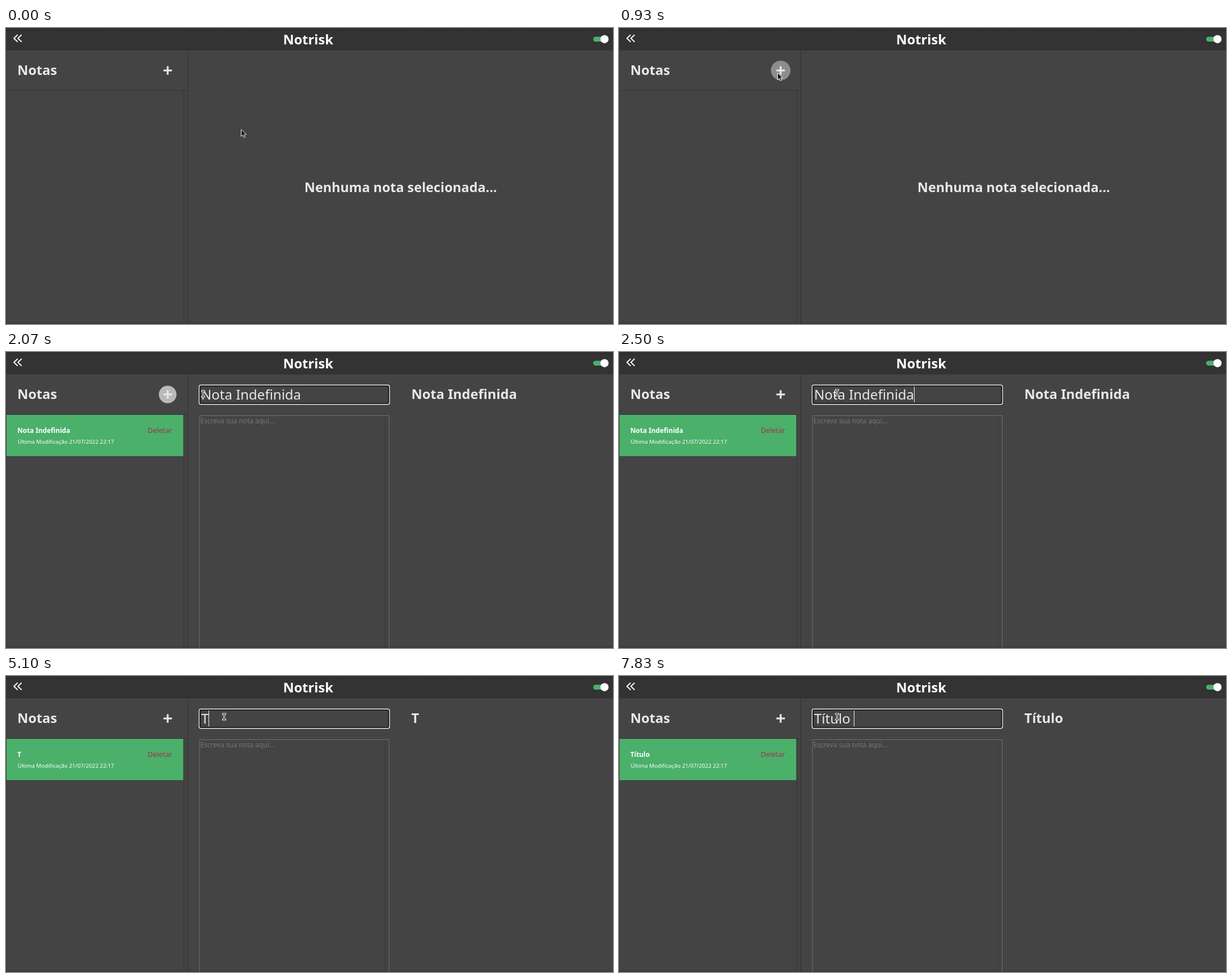
An HTML page with a canvas for the animation above (8000 ms loop, 1070 by 523 pixels).

```html
<!DOCTYPE html>
<html lang="pt-BR">
<head>
<meta charset="utf-8">
<title>Notrisk</title>
<style>
  html, body { margin: 0; width: 100%; height: 100%; overflow: hidden; background: #444; }
  canvas { display: block; }
</style>
</head>
<body>
<canvas id="stage" width="1070" height="523"></canvas>
<script>
const W = 1070, H = 523, LOOP = 8000;
const ctx = document.getElementById('stage').getContext('2d');
const FONT = '"Noto Sans", "Open Sans", sans-serif';
const HEADING = '700 23.6px ' + FONT;
const INPUT = '400 24px ' + FONT;
const LIGHT = '#e8e8e8', LINE = '#343434', GREEN = '#4bb06a';

const CREATED = 1230, CLICKED = 2770, SELECTED = 3570;
// Title text from each moment on
const TYPING = [
  [CREATED, 'Nota Indefinida'], [5100, 'T'], [6430, 'Tí'], [6830, 'Tít'],
  [6970, 'Títu'], [7270, 'Títul'], [7530, 'Título'], [7830, 'Título ']
];

const clamp = v => Math.max(0, Math.min(1, v));
const span = (t, a, b) => clamp((t - a) / (b - a));
const smooth = p => p * p * (3 - 2 * p);
const easeOut = p => 1 - (1 - p) ** 2;
const mix = (a, b, p) => a + (b - a) * p;

function rect(x, y, w, h, color) {
  ctx.fillStyle = color;
  ctx.fillRect(x, y, w, h);
}

function text(str, x, y, font, color, align = 'left') {
  ctx.font = font;
  ctx.fillStyle = color;
  ctx.textAlign = align;
  ctx.fillText(str, x, y);
}

function disc(x, y, r, color) {
  ctx.fillStyle = color;
  ctx.beginPath();
  ctx.arc(x, y, r, 0, Math.PI * 2);
  ctx.fill();
}

function box(x, y, w, h, r, color, width) {
  ctx.strokeStyle = color;
  ctx.lineWidth = width;
  ctx.beginPath();
  ctx.roundRect(x, y, w, h, r);
  ctx.stroke();
}

function poly(points, close) {
  ctx.beginPath();
  points.forEach(([x, y]) => ctx.lineTo(x, y));
  if (close) ctx.closePath();
}

function shade(y, h, from, to) {
  const g = ctx.createLinearGradient(0, y, 0, y + h);
  g.addColorStop(0, `rgba(0,0,0,${from})`);
  g.addColorStop(1, `rgba(0,0,0,${to})`);
  rect(0, y, W, h, g);
}

function drawHeader() {
  rect(0, 0, W, 39, '#333');
  shade(0, 6, 0.12, 0);
  rect(0, 39, W, 1, '#3b3b3b');
  ctx.strokeStyle = '#f4f4f4';
  ctx.lineWidth = 2;
  ctx.lineCap = 'round';
  ctx.lineJoin = 'round';
  for (const x of [14, 21]) {
    poly([[x + 6, 12.5], [x, 18.2], [x + 6, 24]]);
    ctx.stroke();
  }
  text('Notrisk', 532.7, 29, HEADING, '#fff', 'center');
  ctx.fillStyle = GREEN;
  ctx.beginPath();
  ctx.roundRect(1035, 15.5, 22, 8.5, 4.2);
  ctx.fill();
  disc(1055, 19.7, 7.2, '#fff');
}

function drawAddButton(t) {
  const shown = smooth(span(t, 740, 1010)) * 0.6 + smooth(span(t, 1010, 1250)) * 0.4;
  const left = smooth(span(t, 1920, 2400));
  const alpha = shown * (1 - left) * 0.82;
  const pressed = smooth(span(t, 1000, 1200)) * (1 - left);
  if (alpha > 0) disc(285, 75, mix(17.3, 15, pressed), `rgba(255,255,255,${alpha})`);
  rect(277.5, 73.4, 15, 3.2, LIGHT);
  rect(283.4, 67.5, 3.2, 15, LIGHT);
}

function drawSidebar(t) {
  rect(0, 39, 1, H - 39, LINE);
  rect(320, 39, 1, H - 39, LINE);
  rect(0, 110, 321, 1, LINE);
  rect(313, 111, 1, H - 111, LINE);
  text('Notas', 20, 83, HEADING, LIGHT);
  drawAddButton(t);
}

function drawCard(title) {
  rect(1, 111, 311.5, 73, GREEN);
  text(title, 20, 143, `700 11.8px ${FONT}`, '#fff');
  text('Deletar', 293, 142.5, `400 12.5px ${FONT}`, '#a03352', 'right');
  text('Última Modificação 21/07/2022 22:17', 20.5, 162, `400 9.75px ${FONT}`, '#fff');
}

function drawInput(t, title) {
  box(340.5, 58.5, 335.5, 34, 3, '#fff', 1.4);
  box(342, 60, 332.5, 31, 1.5, '#101010', 1.6);
  const x = 344;
  ctx.font = INPUT;
  ctx.textAlign = 'left';
  const selecting = t >= SELECTED && t < 5100;
  if (selecting) rect(x, 61, ctx.measureText(title).width, 29, '#3f48dc');
  text(title, x, 84, INPUT, selecting ? '#fff' : LIGHT);
  if (selecting) return;

  const placed = t >= CLICKED && t < SELECTED;
  const since = placed ? CLICKED : TYPING.filter(k => k[0] <= t).pop()[0];
  if (Math.floor((t - since) / 600) % 2 === 0) {
    const before = placed ? 'Not' : title;
    rect(Math.round(x + ctx.measureText(before).width), 61, 1, 28, '#f2f2f2');
  }
}

function drawEditor(t, title) {
  drawInput(t, title);
  box(341.5, 112.5, 334, H, 0, '#707070', 1);
  rect(668, 113, 1, H, '#393939');
  text('Escreva sua nota aqui...', 342.5, 126, `400 11.95px ${FONT}`, '#777');
  text(title, 714.5, 83, HEADING, LIGHT);
}

function drawArrow(x, y) {
  ctx.save();
  ctx.translate(x, y);
  poly([[0.5, 0.5], [0.5, 12.5], [3.3, 10], [5.4, 14.6], [7.6, 13.6],
        [5.6, 9.2], [9.2, 9]], true);
  ctx.lineJoin = 'miter';
  ctx.lineWidth = 1;
  ctx.fillStyle = '#141414';
  ctx.strokeStyle = '#f5f5f5';
  ctx.fill();
  ctx.stroke();
  ctx.restore();
}

function drawBeam(x, y) {
  ctx.lineCap = 'butt';
  for (const [color, width] of [['#f0f0f0', 3], ['#151515', 1]]) {
    const e = (width - 1) / 2;
    ctx.strokeStyle = color;
    ctx.lineWidth = width;
    ctx.beginPath();
    ctx.moveTo(x, y - 5);
    ctx.lineTo(x, y + 5);
    for (const dy of [-5, 5]) {
      ctx.moveTo(x - 2.5 - e, y + dy);
      ctx.lineTo(x + 2.5 + e, y + dy);
    }
    ctx.stroke();
  }
}

function drawCursor(t) {
  const inP = smooth(span(t, 70, 900));
  const outP = easeOut(span(t, 1790, 2500)) ** 0.95;
  const x = mix(mix(414, 279, inP), 384, outP);
  const y = mix(mix(179, 79, inP), 72, outP);
  if (t > 1800 && x > 341) drawBeam(Math.round(x) + 0.5, Math.round(y));
  else drawArrow(Math.round(x), Math.round(y));
}

function draw(t) {
  rect(0, 0, W, H, '#444');
  drawHeader();
  drawSidebar(t);
  const entry = TYPING.filter(k => k[0] <= t).pop();
  if (entry) {
    drawCard(entry[1]);
    drawEditor(t, entry[1]);
  } else {
    text('Nenhuma nota selecionada...', 695.7, 290, `700 23.3px ${FONT}`, LIGHT, 'center');
  }
  shade(H - 5, 5, 0, 0.14);
  drawCursor(t);
}

const start = performance.now();
function tick() {
  draw((performance.now() - start) % LOOP);
  requestAnimationFrame(tick);
}
tick();
</script>
</body>
</html>
```
